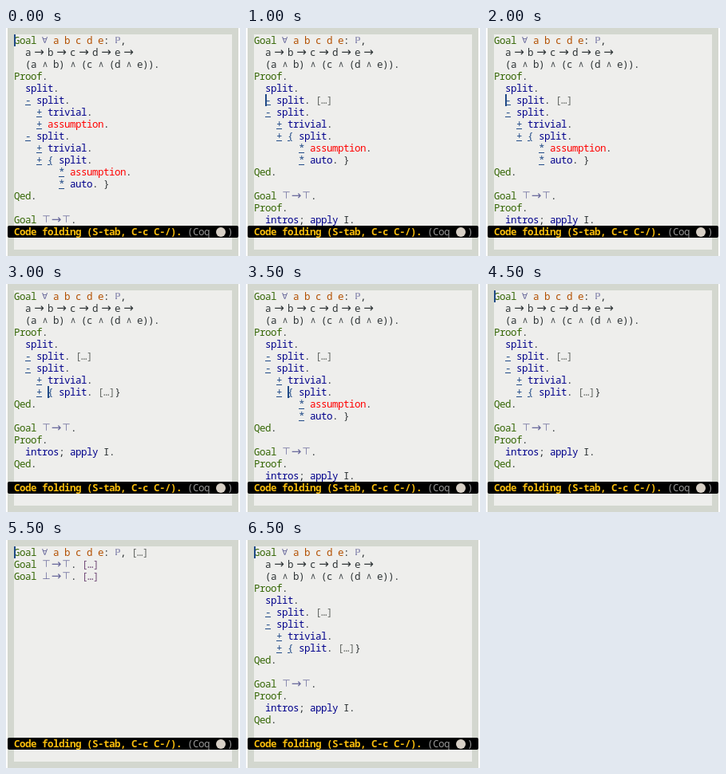
An HTML page that plays this animation: 293 by 286 pixels, repeating every 7500 ms.

```html
<!DOCTYPE html>
<html lang="en">
<head>
<meta charset="utf-8">
<title>Code folding</title>
<style>
html, body { margin: 0; width: 100%; height: 100%; overflow: hidden; background: #fff; }
body { position: relative; font: 12.5px/15px "Noto Sans Mono", "DejaVu Sans Mono", monospace; letter-spacing: -.5px; color: #2e3436; }
#window { position: absolute; left: 2px; top: 0; width: 289px; height: 286px; background: #d3d7cf; }
#buffer { position: absolute; left: 10px; top: 8px; width: 273px; height: 270px; background: #eeeeec; }
#view { height: 240px; overflow: hidden; }
#strip { animation: play 7.5s steps(15) infinite; }
@keyframes play { to { transform: translateY(-100%); } }
.screen { position: relative; height: 240px; overflow: hidden; }
.line { height: 15px; white-space: pre; }
.cursor { position: absolute; width: 2px; height: 15px; background: #204a87; }
.key { color: #346604; }
.tac { color: #00008b; }
.end { color: #f00; }
.var { color: #b35000; }
.bul { color: #204a87; text-decoration: underline; }
.fold { color: #666a66; }
.body { color: #75507b; }
.sym, .top, .imp, .arr, .and {
  display: inline-block; height: 15px; vertical-align: top; text-align: center; letter-spacing: 0;
  font-family: "DejaVu Sans", sans-serif;
}
.sym, .top, .imp { color: #66669a; }
.sym, .and { width: 7px; font-size: 11px; }
.sym { font-size: 10.5px; }
.top { width: 11px; font-size: 12px; }
.imp { width: 14px; font-size: 15px; }
.arr { width: 21px; font-size: 15px; }
.and { color: #555a5c; }
#mode { position: absolute; left: 2px; top: 248px; width: 289px; height: 15px; border-radius: 2px; background: #000; color: #999; white-space: pre; }
#mode span { position: absolute; top: 0; }
#mode b { position: absolute; left: 8px; top: 0; color: #f9bd0c; }
#mode i { position: absolute; left: 261px; top: 2px; width: 12px; height: 12px; border-radius: 50%; background: #d8d0c6; }
</style>
</head>
<body>
<div id="window"></div>
<div id="buffer"><div id="view"><div id="strip"></div></div></div>
<div id="mode"><b>Code folding (S-tab, C-c C-/).</b><span style="left:225px">(Coq</span><i></i><span style="left:275px">)</span></div>
<script>
const dots = ' […]';
const head = 'Goal ∀ a b c d e: ℙ,';
const top2 = 'Goal ⊤→⊤.';
const top3 = 'Goal ⊥→⊤.';
const proof = ['Proof.', '  intros; apply I.', 'Qed.', ''];

// The first goal, with its first bullet and its braces open or folded.
const first = (bullet, brace) => [
  head, '  a→b→c→d→e→', '  (a ∧ b) ∧ (c ∧ (d ∧ e)).', 'Proof.', '  split.',
  ...(bullet ? ['  - split.', '    + trivial.', '    + assumption.'] : ['  - split.' + dots]),
  '  - split.', '    + trivial.',
  ...(brace ? ['    + { split.', '        * assumption.', '        * auto. }'] : ['    + { split.' + dots + '}']),
  'Qed.', ''
];
const rest = [top2, ...proof, top3, ...proof];
const folded = [top2 + dots, top3 + dots];

const open = [...first(true, true), ...rest];
const half = [...first(false, true), ...rest];
const shut = [...first(false, false), ...rest];

// Each step: lines, cursor column, cursor row. The last one holds twice as long.
const home = [shut, 0, 0];
const steps = [
  [open, 0, 0], [open, 2, 5], [half, 2, 5], [open, 2, 5], [half, 2, 5],
  [half, 6, 8], [shut, 6, 8], [half, 6, 8], [shut, 6, 8],
  home, [[head + dots, ...rest], 0, 0], [[head + dots, ...folded], 0, 0],
  [[...first(false, false), ...folded], 0, 0], home, home
];

const syntax = new RegExp([
  '(?<key>Goal|Proof|Qed)',
  '(?<tac>split|trivial|auto|intros|apply)',
  '(?<end>assumption)',
  '(?<var>a b c d e(?=:))',
  '(?<body>(?<=⊤\\. )\\[…\\])',
  '(?<fold>\\[…\\])',
  '(?<bul>[-+*{])',
  '(?<sym>[∀ℙ])',
  '(?<top>[⊤⊥])',
  '(?<imp>(?<=[⊤⊥])→)',
  '(?<arr>→)',
  '(?<and>∧)'
].join('|'), 'g');

const paint = line => line.replace(syntax, (text, ...args) => {
  const groups = args[args.length - 1];
  const name = Object.keys(groups).find(k => groups[k]);
  return `<span class="${name}">${text}</span>`;
});

const screen = ([lines, col, row]) => `<div class="screen">
  ${lines.slice(0, 16).map(l => `<div class="line">${paint(l)}</div>`).join('')}
  <div class="cursor" style="left:${col * 7}px;top:${row * 15}px"></div>
</div>`;

document.getElementById('strip').innerHTML = steps.map(screen).join('');
</script>
</body>
</html>
```
